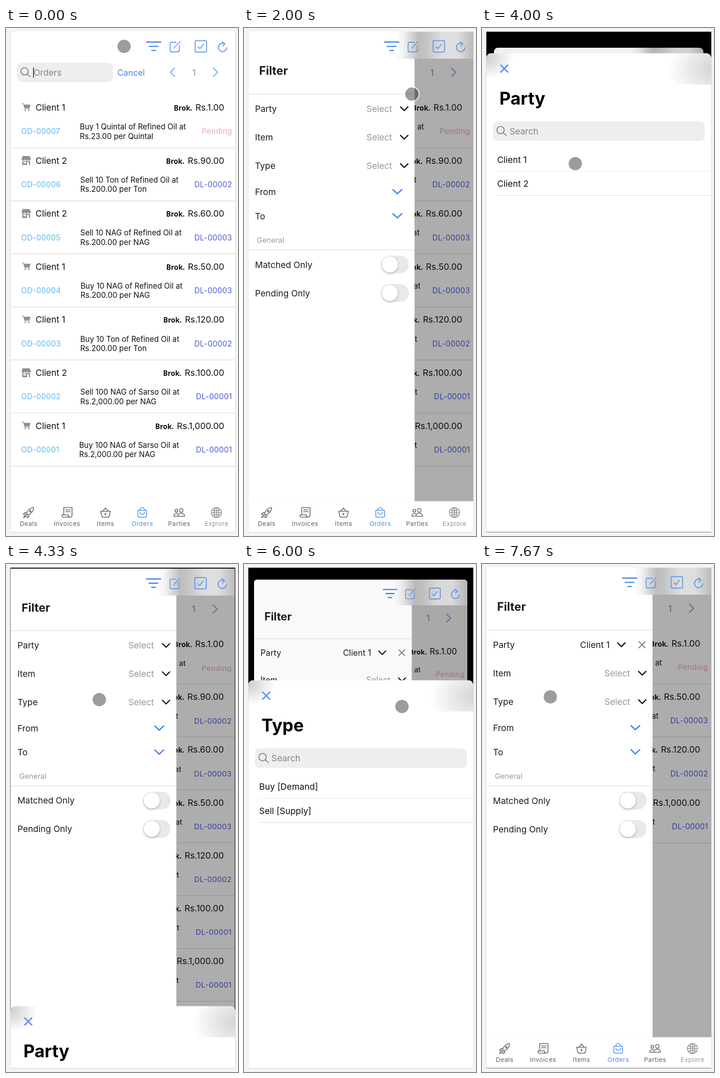
Write an HTML page with a canvas that moves like this. It is 506 px wide and 1107 px high and loops after 8 s.

```html
<!DOCTYPE html>
<html lang="en">
<head>
<meta charset="utf-8">
<title>Orders filter</title>
<style>
html, body { margin: 0; width: 100%; height: 100%; overflow: hidden; background: #f4f4f4; }
canvas { display: block; width: 506px; height: 1107px; }
</style>
</head>
<body>
<canvas id="stage"></canvas>
<script>
const W = 506, H = 1107, LOOP = 8000, STEPS = 24;
const LEFT = 9, RIGHT = 500, TOP = 8, BOTTOM = 1099, DRAWER_RIGHT = 372, TABS_TOP = 1031.5;
const BLUE = '#4a88ea', GRAY = '#8e8e93', INK = '#1c1c1c', LINE = '#dadada';

const canvas = document.getElementById('stage');
const ratio = window.devicePixelRatio || 1;
canvas.width = W * ratio;
canvas.height = H * ratio;
const c = canvas.getContext('2d');

// Keys are [step, ...values]; a value holds until the next key.
const POINTER = [[0, 257.5, 40], [1, 327, 40], [2, 324, 47], [3, 323.5, 46], [6, 366, 144],
  [7, 359, 181], [8, 358.5, 185.5], [12, 203.5, 295.5], [15, 344.5, 310.5], [21, 149, 289.5]];
const SHEET = [[0, 0], [9, .506], [10, .99], [11, 1], [13, .13], [14, 0],
  [18, .81], [19, 1], [22, .57], [23, 0]];
const DRAWER = [[0, 0], [4, .96], [5, 1]];
const CLICKS = [3, 8, 17, 21];
const hold = (keys, step) => keys.filter(k => k[0] <= step).pop().slice(1);

const ORDERS = [
  ['7', 1, '1.00', 161, 'Buy 1 Quintal of Refined Oil at', 'Rs.23.00 per Quintal', 'Pending'],
  ['6', 2, '90.00', 162, 'Sell 10 Ton of Refined Oil at', 'Rs.200.00 per Ton', 'DL-00002'],
  ['5', 2, '60.00', 162, 'Sell 10 NAG of Refined Oil at', 'Rs.200.00 per NAG', 'DL-00003'],
  ['4', 1, '50.00', 162.5, 'Buy 10 NAG of Refined Oil at', 'Rs.200.00 per NAG', 'DL-00003'],
  ['3', 1, '120.00', 162, 'Buy 10 Ton of Refined Oil at', 'Rs.200.00 per Ton', 'DL-00002'],
  ['2', 2, '100.00', 162, 'Sell 100 NAG of Sarso Oil at', 'Rs.2,000.00 per NAG', 'DL-00001'],
  ['1', 1, '1,000.00', 159.5, 'Buy 100 NAG of Sarso Oil at', 'Rs.2,000.00 per NAG', 'DL-00001']
];

const TABS = [
  ['Deals', 49, 'M-4 3C-3-4 3-10 11-11C11-3 6 3-2 5ZM-3 0L-8 0L-11 4L-5 4M0 5L1 9L-3 11L-4 6M-7 6L-11 11L-6 8M2.5-4.5h3v3h-3Z'],
  ['Invoices', 133, 'M-7 5V-11H11V6Q11 10 7 10H-8Q-11 10-11 5H3V7Q4 10 7 10M-3-6H7M-3-2H7'],
  ['Items', 217, 'M-10.5-3H10.5L8 8Q7.5 10 5 10H-5Q-7.5 10-8 8ZM-6-3L0-10L6-3M0 1v4M-1.5 3h3'],
  ['Orders', 297, 'M-9.5-5H9.5V7Q9.5 10 6.5 10H-6.5Q-9.5 10-9.5 7ZM-5-5V-6A5 5 0 0 1 5-6V-5M-5-1A5 5 0 0 0 5-1'],
  ['Parties', 377.5, 'M1-5a3.8 4 0 1 0 7.6 0a3.8 4 0 1 0-7.6 0M-3 8Q-2 1 4.8 1T12 8ZM-9-4a3 3.2 0 1 0 6 0a3 3.2 0 1 0-6 0M-5 8H-11.5Q-11 2-6 2Q-4 2-3 2.7'],
  ['Explore', 459, 'M-11 0A11 11 0 1 0 11 0A11 11 0 1 0-11 0ZM-5 0A5 11 0 1 0 5 0A5 11 0 1 0-5 0M0-11V11M-11 0H11M-9-6Q0-2 9-6M-9 6Q0 2 9 6']
];

const CART = 'M4 3H18.5L16.5 10.5H5.5ZM5.3 15.3a1.7 1.7 0 1 0 3.4 0a1.7 1.7 0 1 0-3.4 0M13 15.3a1.7 1.7 0 1 0 3.4 0a1.7 1.7 0 1 0-3.4 0';
const STORE = 'M2.5 0H17.5L20 6A3.33 3.5 0 0 1 13.33 6A3.33 3.5 0 0 1 6.67 6A3.33 3.5 0 0 1 0 6ZM1.5 10.5H18.5V19.5H1.5ZM4 12V16H9.5V12ZM12 13V19.5H16V13Z';

function text(str, x, y, { size = 19, color = '#111', weight = 400, align = 'left', family = 'Inter', spacing = 0 } = {}) {
  c.font = `${weight} ${size}px "${family}", sans-serif`;
  c.letterSpacing = spacing + 'px';
  c.textAlign = align;
  c.fillStyle = color;
  c.fillText(str, x, y);
  return c.measureText(str).width;
}

function rect(x, y, w, h, color, radius = 0) {
  c.fillStyle = color;
  c.beginPath();
  c.roundRect(x, y, w, h, radius);
  c.fill();
}

function path(d, x, y, color, width = 0) {
  c.save();
  c.translate(x, y);
  c.lineCap = c.lineJoin = 'round';
  c.lineWidth = width;
  c.strokeStyle = c.fillStyle = color;
  if (width) c.stroke(new Path2D(d));
  else c.fill(new Path2D(d), 'evenodd');
  c.restore();
}

function circle(x, y, r, fill, stroke, width) {
  c.beginPath();
  c.arc(x, y, r, 0, 7);
  if (fill) { c.fillStyle = fill; c.fill(); }
  if (stroke) { c.strokeStyle = stroke; c.lineWidth = width; c.stroke(); }
}

const rule = (x1, x2, y, color = LINE) => rect(x1, y - .6, x2 - x1, 1.2, color);

function gradient(x1, x2, stops) {
  const g = c.createLinearGradient(x1, 0, x2, 0);
  stops.forEach(([at, color]) => g.addColorStop(at, color));
  return g;
}

function searchBox(y, width, label) {
  rect(24, y, width, 42.5, '#eeeeee', 10);
  path('M-10-1.5A8 8 0 1 0 6-1.5A8 8 0 1 0-10-1.5M4 4.5L10.5 10.5', 42.5, y + 20.5, '#707070', 1.7);
  text(label, 60, y + 28.5, { color: '#858585' });
}

function orderRow([id, client, amount, x, line1, line2, status], y) {
  if (client === 1) {
    path(CART, 35, y + 18.5, GRAY);
    path('M0 1H3L6 12H16.5', 35, y + 18.5, GRAY, 1.3);
  } else path(STORE, 34, y + 18, GRAY);
  text('Client ' + client, 64.5, y + 34.5);
  const width = text('Rs.' + amount, 476, y + 34.5, { align: 'right' });
  text('Brok.', 476 - width - 7, y + 34.5, { size: 15.3, weight: 700, align: 'right', family: 'Noto Sans' });
  const small = { size: 16.6 }, code = { size: 16.6, spacing: .25 };
  text('OD-0000' + id, 33, y + 86, { ...code, color: '#5abcf0' });
  text(line1, x, y + 75.8, small);
  text(line2, x, y + 96.2, small);
  text(status, 493, y + 86, { ...code, align: 'right', color: status === 'Pending' ? '#eda9b8' : '#4b5bd9' });
  rule(LEFT, RIGHT, y + 115.6, '#d8d8d8');
}

function ordersPage(step) {
  searchBox(75.5, 209, 'Orders');
  if (step < 3) rect(59.2, 86, 1.6, 22.5, '#222');
  text('Cancel', 243, 104, { size: 18.2, color: '#4583df' });
  path('M5-9L-4 0L5 9', 362.5, 96.5, '#8bb7f4', 2.6);
  path('M-5-9L4 0L-5 9', 457.5, 96.5, '#8bb7f4', 2.6);
  text('1', 410, 103.5, { color: '#8c8c8c', align: 'center' });
  ORDERS.filter(order => step < 15 || order[1] === 1)
    .forEach((order, i) => orderRow(order, 145.4 + i * 115.6));
}

function toggle(y) {
  rect(299, y - 19.5, 60.5, 39, '#e9e9e9', 19.5);
  c.save();
  c.shadowColor = 'rgba(0,0,0,.25)';
  c.shadowBlur = 5;
  c.shadowOffsetY = 2;
  circle(318, y, 17.5, '#fff');
  c.restore();
}

function drawer(step) {
  rect(LEFT, TOP, DRAWER_RIGHT - LEFT, TABS_TOP - TOP, '#fff');
  text('Filter', 33, 102, { size: 25, weight: 700, color: INK });
  rule(LEFT, DRAWER_RIGHT, 144);
  rule(LEFT, DRAWER_RIGHT, 483.5);
  const pressed = { 9: 'Party', 18: 'Type' }[step];
  const chevron = 'M-8-4L0 4L8-4';
  [['Party', 183], ['Item', 245], ['Type', 307]].forEach(([name, y]) => {
    text(name, 24, y, { color: INK });
    if (name === 'Party' && step >= 14) {
      text('Client 1', 278.5, y, { color: INK, align: 'right' });
      path(chevron, 304, y - 7, INK, 2.6);
      path('M-6.5-6.5L6.5 6.5M6.5-6.5L-6.5 6.5', 349, y - 7, '#8c8c8c', 2.5);
    } else {
      const faded = name === pressed;
      text('Select', 323, y, { color: faded ? '#cdcdcd' : '#989898', align: 'right' });
      path(chevron, 349.5, y - 7, faded ? '#999' : INK, 2.6);
    }
  });
  [['From', 364], ['To', 416.5]].forEach(([name, y]) => {
    text(name, 24, y, { color: INK });
    path('M-9.5-4.5L0 4.5L9.5-4.5', 334.5, y - 7.2, '#3f83f1', 2.8);
  });
  text('General', 28, 467.5, { size: 16.2, color: '#999' });
  [['Matched Only', 522.5], ['Pending Only', 584.5]].forEach(([name, y]) => {
    text(name, 24, y, { color: INK });
    toggle(y - 7);
  });
}

function toolbar(open) {
  rect(LEFT, TOP, RIGHT - LEFT, 59, open ? gradient(330, RIGHT, [[0, '#fff'], [.1, '#f3f3f3'],
    [.3, '#bdbdbd'], [.4, '#c4c4c4'], [.6, '#dedede'], [.8, '#dedede'], [1, '#bababa']]) : '#fff');
  path('M-15.5-9.3H15.5M-9.5 0H9.5M-4 9H4', 322, 40, BLUE, 2.7);
  path('M2-9H-8Q-11-9-11-6V9Q-11 12-8 12H6Q9 12 9 9V-2M-3 4L10.5-10.5', 369, 40, '#5d95ed', 1.8);
  path('M-10-12.5H10Q12.5-12.5 12.5-10V10Q12.5 12.5 10 12.5H-10Q-12.5 12.5-12.5 10V-10Q-12.5-12.5-10-12.5M-6 1L-2 5L6-5', 425, 40, '#5d95ed', 2);
  path('M5-7.5A9.2 9.2 0 1 0 9.2 1M-1-12L5-7.5L0-2.5', 472.5, 42, '#5d95ed', 2);
}

function tabBar() {
  rect(LEFT, TABS_TOP, RIGHT - LEFT, BOTTOM - TABS_TOP, '#fff');
  TABS.forEach(([name, x, icon]) => {
    const color = { Orders: BLUE, Explore: '#929292' }[name] || '#5f5f5f';
    path(icon, x, 1056, color, 1.6);
    text(name, x + .3, 1084.5, { size: 13.5, color, align: 'center', spacing: .6 });
  });
}

function app(step) {
  const [open] = hold(DRAWER, step);
  rect(LEFT, TOP, RIGHT - LEFT, BOTTOM - TOP, '#fff');
  ordersPage(step);
  if (open) {
    rect(LEFT, TOP, RIGHT - LEFT, TABS_TOP - TOP, `rgba(0,0,0,${.32 * open})`);
    c.save();
    c.beginPath();
    c.rect(LEFT, TOP, RIGHT - LEFT, BOTTOM - TOP);
    c.clip();
    c.translate((open - 1) * (DRAWER_RIGHT - LEFT), 0);
    drawer(step);
    c.restore();
  }
  toolbar(open > 0);
  tabBar();
}

function glow(x, y, rx, ry, alpha) {
  c.save();
  c.translate(x, y);
  c.scale(rx, ry);
  const g = c.createRadialGradient(0, 0, 0, 0, 0, 1);
  g.addColorStop(0, `rgba(0,0,0,${alpha})`);
  g.addColorStop(1, 'rgba(0,0,0,0)');
  c.fillStyle = g;
  c.fillRect(-1, -1, 2, 2);
  c.restore();
}

function sheet(top, title, options) {
  c.save();
  c.beginPath();
  c.rect(LEFT, TOP, RIGHT - LEFT, BOTTOM - TOP);
  c.clip();
  c.beginPath();
  c.roundRect(LEFT, top, RIGHT - LEFT, BOTTOM, 11);
  c.clip();
  c.translate(0, top);
  rect(LEFT, 0, RIGHT - LEFT, BOTTOM, '#fff');
  c.save();
  c.beginPath();
  c.rect(LEFT, 0, RIGHT - LEFT, 68);
  c.clip();
  glow(LEFT, 10, 60, 45, .2);
  glow(RIGHT, 35, 95, 75, .17);
  c.restore();
  path('M-7.5-7.5L7.5 7.5M7.5-7.5L-7.5 7.5', 48.5, 33.5, '#6598f3', 3.2);
  text(title, 38, 111.5, { size: 38, weight: 700, color: '#000' });
  searchBox(148.5, 462, 'Search');
  options.forEach((option, i) => {
    text(option, 33, 239 + i * 52.3);
    rule(33, RIGHT, 257.5 + i * 52.5, i ? '#dedede' : '#e9e9e9');
  });
  c.restore();
}

function draw(step) {
  c.setTransform(ratio, 0, 0, ratio, 0, 0);
  rect(0, 0, W, H, '#f4f4f4');
  const [raised] = hold(SHEET, step);
  if (raised) {
    // The page recedes behind the rising sheet.
    const depth = raised ** 1.4, middle = (LEFT + RIGHT) / 2;
    rect(LEFT, TOP, RIGHT - LEFT, BOTTOM - TOP, '#000');
    c.save();
    c.translate(middle, TOP + 35 * depth);
    c.scale(1 - .07 * depth, 1 - .07 * depth);
    c.translate(-middle, -TOP);
    c.beginPath();
    c.roundRect(LEFT, TOP, RIGHT - LEFT, BOTTOM - TOP, 10 * depth);
    c.clip();
    app(step);
    rect(LEFT, TOP, RIGHT - LEFT, BOTTOM - TOP, `rgba(0,0,0,${.06 * depth ** 3})`);
    c.restore();
    const top = BOTTOM - 1044 * raised;
    if (step < 15) sheet(top, 'Party', ['Client 1', 'Client 2']);
    else sheet(top, 'Type', ['Buy [Demand]', 'Sell [Supply]']);
  } else app(step);

  rect(8.5, TOP, 1, BOTTOM - TOP, LINE);
  rect(RIGHT, TOP, 1, BOTTOM - TOP, LINE);
  const darkEdge = step === 11 || step === 12 || step >= 20;
  rect(LEFT, BOTTOM - 1, RIGHT - LEFT, 1.3, darkEdge ? '#858585' : LINE);

  const [x, y] = hold(POINTER, step);
  circle(x, y, 14.6, 'rgba(0,0,0,.39)');
  circle(x, y, 16, null, 'rgba(255,255,255,.55)', 2.8);
  if (CLICKS.includes(step)) circle(x, y, 33.5, null, '#111', 2.5);
}

// The screen refreshes three times a second.
function tick() {
  const time = performance.now() % LOOP;
  draw(Math.floor((time + 4) / LOOP * STEPS) % STEPS);
  requestAnimationFrame(tick);
}
tick();
</script>
</body>
</html>
```
